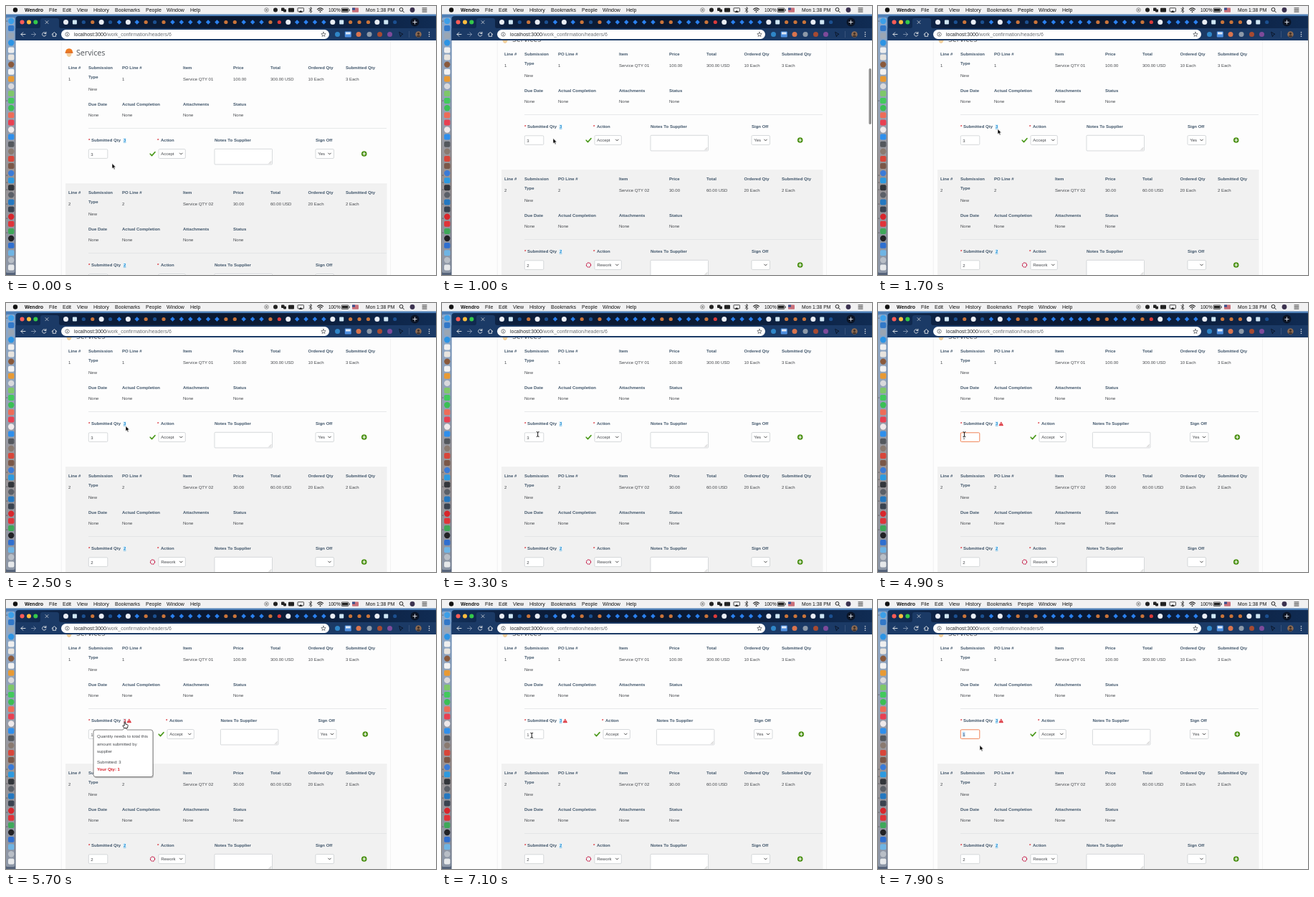
An HTML page that plays this animation: 600x375 px, repeating every 8 s.

```html
<!DOCTYPE html>
<html lang="en">
<head>
<meta charset="utf-8">
<title>Work confirmation</title>
<style>
html, body { margin: 0; width: 100%; height: 100%; overflow: hidden; background: #fff; }
svg { display: block; width: 100vw; height: 100vh; }
text { font-family: "Liberation Sans", Arial, sans-serif; font-size: 6px; fill: #45484c; white-space: pre; }
.b { font-weight: bold; fill: #41566b; }
.m { font-size: 7px; fill: #111; }
.red { fill: #d8202a; }
.title { font-family: "Open Sans", sans-serif; font-size: 10.7px; fill: #4f5358; }
.box { fill: #fff; stroke: #c6cacd; stroke-width: .7; }
.line { fill: none; stroke-linecap: round; stroke-linejoin: round; }
</style>
</head>
<body>
<svg id="stage" viewBox="0 0 600 375"></svg>
<script>
const stage = document.getElementById('stage');

const rect = (x, y, w, h, fill, r = 0, more = '') =>
  `<rect x="${x}" y="${y}" width="${w}" height="${h}" rx="${r}" ${fill ? `fill="${fill}"` : ''} ${more}/>`;
const disc = (x, y, r, fill, more = '') => `<circle cx="${x}" cy="${y}" r="${r}" fill="${fill}" ${more}/>`;
const text = (x, y, s, cls = '', more = '') => `<text x="${x}" y="${y + 2.1}" class="${cls}" ${more}>${s}</text>`;
const line = (d, color, w = 1, more = '') => `<path class="line" d="${d}" stroke="${color}" stroke-width="${w}" ${more}/>`;
const group = (id, body) => `<g id="${id}">${body}</g>`;

function menuBar() {
  const items = [[60, 'File'], [79, 'Edit'], [99, 'View'], [122, 'History'], [152, 'Bookmarks'],
    [195, 'People'], [224, 'Window'], [257, 'Help']];
  return rect(0, 0, 600, 11.5, '#f1f1f2') +
    disc(13, 5.5, 3.2, '#111') +
    text(26, 5.6, 'Wendro', 'm', 'font-weight="bold"') +
    items.map(([x, s]) => text(x, 5.6, s, 'm')).join('') +
    disc(363.5, 5.5, 2.8, 'none', 'stroke="#777" stroke-width=".8"') + disc(363.5, 5.5, 1.2, '#777') +
    disc(376, 5.5, 3, '#222') +
    rect(384, 2.5, 4.5, 4.5, '#222', 1) + rect(387, 4.5, 4, 4, '#222', 1) +
    rect(394, 2.8, 8, 5.6, '#222', 1) +
    rect(407, 2.8, 8.5, 5, 'none', .6, 'stroke="#222" stroke-width=".8"') + '<path d="M411.2 6 L413.8 9 H408.6Z" fill="#222"/>' +
    line('M423 3.5 L427 7.5 L425 9.3 V1.7 L427 3.5 L423 7.5', '#222', .8) +
    line('M434.5 4.6 Q438.5 1.2 442.5 4.6 M436 6.4 Q438.5 4.4 441 6.4', '#222', 1.1) + disc(438.5, 8.2, .9, '#222') +
    text(450, 5.6, '100%', 'm', 'style="font-size:6.4px"') +
    rect(468, 3, 10, 5.4, 'none', 1, 'stroke="#222" stroke-width=".8"') + rect(469, 4, 8, 3.4, '#222') + rect(478.6, 4.6, 1, 2.2, '#222') +
    rect(483, 2.6, 9, 6.2, '#c9707a', .8) + rect(483, 2.6, 4, 3, '#354f8d') +
    text(502, 5.6, 'Mon 1:38 PM', 'm', 'style="font-size:6.8px"') +
    disc(551.5, 4.9, 2.4, 'none', 'stroke="#222"') + line('M553.4 6.8 L555.3 8.8', '#222') +
    disc(567, 5.5, 3.4, '#3c3350') +
    line('M581 3 H587 M581 5.5 H587 M581 8 H587', '#222');
}

function dock() {
  const colors = ['3c9fe8', '3278c8', '9aa6b4', '2c94e4', 'efefef', 'e8e4de', '8a5a3c', 'f2f2f2', 'e89a34',
    'd9d9dc', '7fc76a', '42c95c', '3bbf55', 'ee6c58', 'e84052', 'efe9ea', '2f8fec', '54585e', '8a7a70',
    'd8463a', '7b5848', '3a7bd8', '2d9ae0', '33363b', '5b6068', '2478c0', '3a4350', 'd8262c', 'e0343a',
    '3fa85a', '222226', '2f6fd0', '6fb4e4', 'b8bec6', 'e6e8ea'];
  return rect(0, 11, 14, 364, 'url(#sky)') + rect(0, 16, 12.5, 356, '#dfe4ea', 2, 'opacity=".4"') +
    colors.map((c, i) => {
      const y = 21 + i * 10.1;
      return i % 3 ? rect(3, y - 4, 8.4, 8, '#' + c, 2) : disc(7.2, y, 4.2, '#' + c);
    }).join('') +
    [21, 132, 236, 246, 256, 276, 296, 316].map(y => disc(1.2, y, .6, '#222')).join('') +
    line('M2 338 H12', '#8b929b', .5);
}

function browser() {
  const tints = { g: '#e9edf4', w: '#cfe6f4', b: '#2a80ee', d: '#1b4f8f', o: '#c9743a', r: '#d93a3a' };
  const tabs = 'gwdogdbgbodobbbbbboobbborgbbbbgwooogwd';
  const tab = (c, i) => {
    const x = 83.5 + i * 12.41;
    if (c === 'w') return rect(x - 3, 19.5, 6, 6, tints.w, 1);
    if (c === 'b') return rect(x - 2.3, 20.2, 4.6, 4.6, tints.b, 0, `transform="rotate(45 ${x} 22.5)"`);
    return disc(x, 22.5, c === 'g' ? 3.5 : 2.6, tints[c]);
  };
  const extras = [[462.5, '#2f86c8'], [492, '#d9744e'], [507, '#8d99a8'], [521.5, '#a64a32'], [535.5, '#7d4a9a']];
  return `<path d="M13.5 48 V18 Q13.5 14 17.5 14 H600 V48Z" fill="url(#night)"/>` +
    rect(13.5, 31, 586.5, 17, '#1b3a66') +
    `<path d="M45 31 Q48 31 48 28 V20 Q48 17 51 17 H71 Q74 17 74 20 V28 Q74 31 77 31Z" fill="#1b3a66"/>` +
    disc(22.5, 22.5, 3, '#fc5c56') + disc(32, 22.5, 3, '#fdbd3e') + disc(41.3, 22.5, 3, '#34c84a') +
    line('M55 20.6 L59 24.6 M59 20.6 L55 24.6', '#d5d7da', .8) +
    [...tabs].map(tab).join('') +
    disc(570.5, 22.5, 6, '#0a1426') + line('M570.5 19.9 V25.1 M567.9 22.5 H573.1', '#e8eaee', .9) +
    line('M27 39.5 H21 M23.7 36.8 L21 39.5 L23.7 42.2', '#e6e8ea', .9) +
    line('M35.5 39.5 H41.5 M38.8 36.8 L41.5 39.5 L38.8 42.2', '#8496b0', .9) +
    line('M55.7 38.2 A2.7 2.7 0 1 0 55.8 40.5 M55.9 36.3 V38.5 H53.7', '#e6e8ea', .9) +
    line('M64 39.6 L67.4 36.6 L70.8 39.6 M65.2 39 V42.3 H69.6 V39', '#e6e8ea', .9) +
    rect(77, 33, 374, 13, '#fff', 6.5) +
    disc(85.5, 39.5, 2.7, 'none', 'stroke="#5f6368" stroke-width=".8"') + rect(85.1, 38.9, .9, 2.2, '#5f6368') + rect(85.1, 37.5, .9, .8, '#5f6368') +
    text(95, 39.7, 'localhost:3000<tspan fill="#6c7075">/work_confirmation/headers/6</tspan>', '', 'style="font-size:6.95px;fill:#222529"') +
    line('M443 36.3 L443.9 38.5 L446.2 38.7 L444.5 40.2 L445 42.4 L443 41.2 L441 42.4 L441.5 40.2 L439.8 38.7 L442.1 38.5Z', '#4a4e53', .7) +
    extras.map(([x, c]) => disc(x, 39.5, 3.5, c)).join('') +
    rect(472.8, 35.5, 9, 8, '#4e8fe0', 1) + rect(474, 36.5, 6.6, 3, '#dfe8f6') +
    line('M549 36.5 L554 39.4 L551.6 40.2 L550.6 42.6Z', '#0b1526', .9) +
    rect(562.3, 35, .6, 9, '#4a6288') +
    disc(575.5, 39.5, 4.3, '#8c6a52') + disc(575.5, 38.4, 1.6, '#40322b') + `<path d="M572.5 42.3 Q575.5 38.8 578.5 42.3 Q575.5 44.5 572.5 42.3Z" fill="#40322b"/>` +
    [36.7, 39.5, 42.3].map(y => disc(590.5, y, .8, '#e6e8ea')).join('');
}

const chevron = (x, y) => line(`M${x - 1.8} ${y - .9} L${x} ${y + .9} L${x + 1.8} ${y - .9}`, '#444', 1);
const select = (x, y, w, s) => rect(x, y - 6.5, w, 13, '', 1.5, 'class="box"') + text(x + 3.2, y + .1, s) + chevron(x + w - 6, y);

// y is the centre of the first heading line
function lineItem(n, y, v) {
  const heads = [[87, 'Line #'], [115, 'Submission'], [162, 'PO Line #'], [247, 'Item'], [317, 'Price'],
    [369, 'Total'], [421.5, 'Ordered Qty'], [474, 'Submitted Qty']];
  const cells = [[87, n], [162, n], [247, 'Service QTY 0' + n], [317, v.price], [369, v.total], [421.5, v.ordered], [474, v.qty + ' Each']];
  const low = [[115, 'Due Date'], [162, 'Actual Completion'], [247, 'Attachments'], [317, 'Status']];
  const label = y + 102, field = y + 121;
  const mark = n === 1
    ? line(`M201.2 ${field + .2} L203.5 ${field + 2.6} L208 ${field - 2.4}`, '#4c9a1c', 1.6)
    : disc(204.5, field, 3.1, 'none', 'stroke="#c41240" stroke-width="1.1" stroke-dasharray="1.9 .6"');
  const star = x => text(x, label, '*', 'b red');
  return heads.map(([x, s]) => text(x, y + .4, s, 'b')).join('') +
    text(115, y + 14, 'Type', 'b') +
    cells.map(([x, s]) => text(x, y + 16.7, s)).join('') +
    text(115, y + 30.7, 'New') +
    low.map(([x, s]) => text(x, y + 51.4, s, 'b') + text(x, y + 67.3, 'None')).join('') +
    rect(115, y + 85, 416, .7, '#dfe1e3') +
    star(115) + text(119, label, 'Submitted Qty', 'b') +
    rect(163.3, label - 3, 4.4, 6.2, '#e2f2fb') +
    text(164, label, v.qty, 'b', `id="link${n}" style="fill:#1287d0"`) + rect(163.8, label + 2.8, 3.6, .6, '#1287d0', 0, `id="rule${n}"`) +
    rect(115.3, field - 6.2, 26.5, 12.6, '', 1.2, `class="box" id="field${n}"`) +
    rect(117.9, field - 3.2, 3.6, 6.6, '#b4d5f7', 0, `id="sel${n}" visibility="hidden"`) +
    text(118.3, field + .4, v.qty, '', `id="value${n}"`) +
    group('action' + n, mark + star(211) + text(216, label, 'Action', 'b') + select(213, field, 37.3, v.action)) +
    group('notes' + n, text(291, label, 'Notes To Supplier', 'b') + rect(291, field - 6.7, 80.5, 21.6, '', 1, 'class="box"') +
      line(`M367 ${field + 13.5} L370 ${field + 10.5} M369 ${field + 13.5} L370 ${field + 12.5}`, '#999', .6)) +
    group('sign' + n, text(432, label, 'Sign Off', 'b') + select(432, field, 25.5, v.sign)) +
    group('plus' + n, disc(499.7, field, 3.8, '#4a9010') + line(`M499.7 ${field - 1.8} V${field + 1.8} M497.9 ${field} H501.5`, '#fff', 1.2));
}

function page() {
  return rect(13.5, 48, 586.5, 327, '#fdfdfd') +
    '<g clip-path="url(#view)">' +
    rect(76.8, 48, .7, 327, '#ececed') + rect(536, 48, .7, 327, '#ececed') +
    group('sheet',
      '<path d="M83 46 Q83 40.5 88 40.3 Q93 40.5 93 46Z" fill="#ee7a21"/>' + rect(82.4, 45.2, 11.2, 1.5, '#d9631a', .7) +
      '<path d="M84.3 47 H91.7 Q91.4 51.5 88 52 Q84.6 51.5 84.3 47Z" fill="#f5cf9c"/>' +
      text(98, 47.9, 'Services', 'title') +
      rect(83, 229, 448.5, 200, '#f1f1f1') + rect(83, 228.6, 448.5, .7, '#e6e6e6') +
      lineItem(1, 66, { price: '100.00', total: '300.00 USD', ordered: '10 Each', qty: 3, action: 'Accept', sign: 'Yes' }) +
      lineItem(2, 240, { price: '30.00', total: '60.00 USD', ordered: '20 Each', qty: 2, action: 'Rework', sign: '' }) +
      group('warn', '<path d="M171.8 165.9 L174.5 170.8 H169.1Z" fill="#d8202a" stroke="#d8202a" stroke-width=".7" stroke-linejoin="round"/>' +
        rect(171.4, 167.3, .8, 1.8, '#fff') + rect(171.4, 169.6, .8, .7, '#fff')) +
      group('tip', rect(123, 182.2, 83, 66, '#000', 3.5, 'opacity=".22"') +
        '<path d="M125 181 H163 L166 177.6 L169 181 H202 Q205 181 205 184 V243.5 Q205 246.5 202 246.5 H125 Q122 246.5 122 243.5 V184 Q122 181 125 181Z" fill="#fff" stroke="#777" stroke-width=".9"/>' +
        text(127, 190, 'Quantity needs to total this') + text(127, 200.4, 'amount submitted by') + text(127, 210.8, 'supplier') +
        text(127, 225.8, 'Submitted: 3') + text(127, 236.2, 'Your Qty: 1', 'b red'))) +
    rect(595.6, 87, 3.4, 78, '#8f8f8f', 1.7, 'id="thumb"') +
    '</g>';
}

const cursors =
  group('arrow', '<path d="M0 0 V7.2 L1.7 5.7 L2.9 8.4 L4.1 7.9 L3 5.2 H5.2Z" fill="#000" stroke="#fff" stroke-width=".6"/>') +
  group('hand', '<path d="M-.8 0 Q0 -1 .8 0 V2.6 L3.6 3.3 Q4.3 3.6 4.1 5 L3.4 8 H-1.2 L-3.2 4.8 Q-2.6 3.6 -.8 4.8Z" fill="#fff" stroke="#000" stroke-width=".8"/>') +
  group('beam', line('M-1.5 -3.4 Q0 -3.4 0 -2.4 Q0 -3.4 1.5 -3.4 M0 -2.4 V2.4 M-1.5 3.4 Q0 3.4 0 2.4 Q0 3.4 1.5 3.4', '#000', .9));

const fade = (id, stops, across) => `<linearGradient id="${id}" x2="${across ? 1 : 0}" y2="${across ? 0 : 1}">` +
  stops.map(([at, c]) => `<stop offset="${at}" stop-color="${c}"/>`).join('') + '</linearGradient>';

stage.innerHTML = '<defs>' +
  fade('sky', [[0, '#4f80b8'], [.4, '#66748a'], [.6, '#6a5c58'], [1, '#55637a']]) +
  fade('night', [[0, '#12305a'], [.15, '#0c1e3c'], [.5, '#0a1830'], [.85, '#0d2345'], [1, '#102c54']], true) +
  `<clipPath id="view">${rect(13.5, 48, 586.5, 327)}</clipPath></defs>` +
  rect(0, 0, 600, 20, '#4f80b8') + dock() + page() + browser() + menuBar() + cursors;

const el = {};
stage.querySelectorAll('[id]').forEach(e => { el[e.id] = e; });

const clamp = x => Math.min(1, Math.max(0, x));
const ease = x => x * x * (3 - 2 * x);
const show = (e, on) => e.setAttribute('visibility', on ? 'visible' : 'hidden');
const move = (e, x, y) => e.setAttribute('transform', `translate(${x} ${y})`);

// time, x, y of the pointer
const path = [[500, 148, 219.5], [1000, 155, 184.5], [1700, 167, 171.5], [2900, 167, 171.5], [3500, 122, 187],
  [3900, 104.5, 187.5], [4700, 104.5, 187.5], [5300, 166, 170.5], [6200, 166, 170.5], [6900, 127, 189],
  [7400, 122, 188], [7900, 142, 202.5]];

function pointer(t) {
  const i = path.findIndex(p => p[0] > t);
  if (i === 0) return path[0].slice(1);
  if (i < 0) return path[path.length - 1].slice(1);
  const [t0, x0, y0] = path[i - 1], [t1, x1, y1] = path[i];
  const k = ease((t - t0) / (t1 - t0));
  return [x0 + (x1 - x0) * k, y0 + (y1 - y0) * k];
}

function draw(t) {
  move(el.sheet, 0, 19 * (1 - ease(clamp((t - 500) / 300))));
  el.thumb.setAttribute('opacity', t < 600 ? 0 : 1 - clamp((t - 1100) / 300));

  const typed = t >= 4500, picked = (t >= 3700 && !typed) || t >= 7400;
  const focus = t >= 3500 && t < 5100 || t >= 7200;
  const tip = t >= 5300 && t < 6300;
  el.value1.textContent = typed ? '1' : '3';
  show(el.sel1, picked);
  el.field1.style.stroke = focus ? '#f08458' : '';
  el.field1.style.strokeWidth = focus ? 1 : '';

  show(el.warn, typed);
  move(el.action1, typed ? 12 : 0, 0);
  move(el.notes1, typed ? 8.4 : 0, 0);
  move(el.sign1, typed ? 3.5 : 0, 0);
  move(el.plus1, typed ? 1.6 : 0, 0);
  show(el.tip, tip);
  el.link1.style.fill = tip ? '#d8202a' : '#1287d0';
  el.rule1.setAttribute('fill', tip ? '#d8202a' : '#1287d0');

  const [x, y] = pointer(t);
  const inField = x > 115 && x < 142 && y > 181 && y < 194 && t > 2900;
  const kind = tip ? 'hand' : inField ? 'beam' : 'arrow';
  for (const k of ['arrow', 'hand', 'beam']) show(el[k], k === kind);
  move(el[kind], x, y);
}

const start = performance.now();
function tick() {
  const t = (performance.now() - start) % 8000;
  draw(Math.floor(t / 100) * 100);
  requestAnimationFrame(tick);
}
tick();
</script>
</body>
</html>
```
